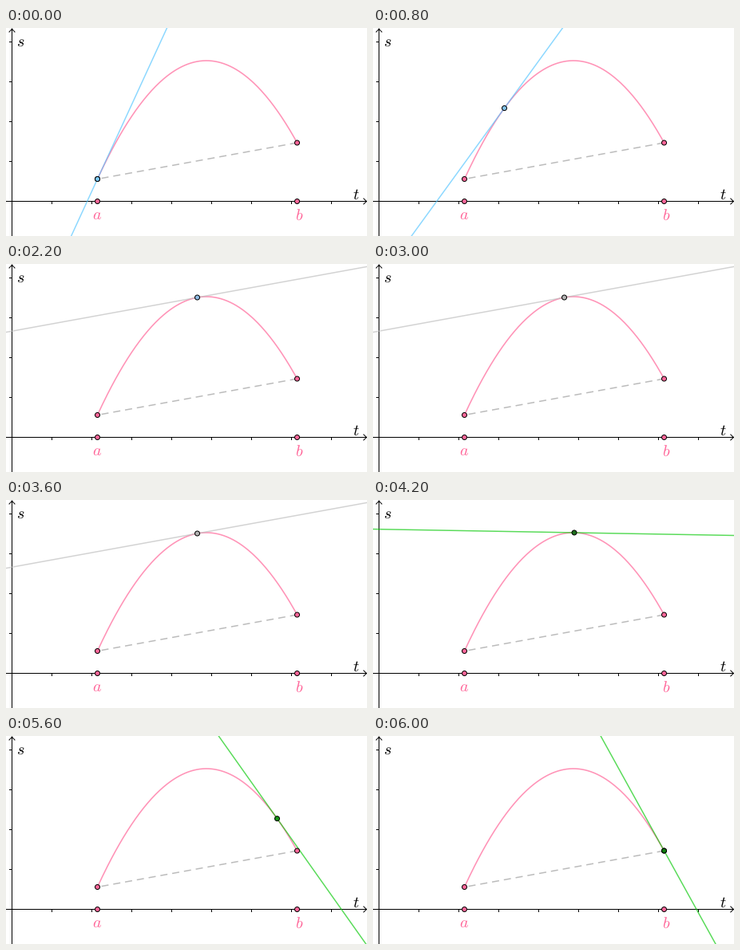
These frames come from a looping animation (452x261 px, 6.2 s). A matplotlib script:

```python
import numpy as np
import matplotlib.pyplot as plt
from matplotlib.animation import FuncAnimation
from matplotlib.colors import to_rgb

W, H, DPI = 452, 261, 64
PX = 72 / DPI            # points per pixel
FRAMES, INTERVAL = 31, 200
STEPS, HALF = 20, 10     # travel steps; the point rests at the middle one

AX_X, AX_Y = 7.5, 217.5  # position of the two axes
XA, YA, XB, YB = 114.5, 189.5, 364.5, 144.0
CHORD = (YB - YA) / (XB - XA)
BEND = 0.007984

PINK, BLUE, GREY, GREEN = "#ff6699", "#4fc3ff", "#bbbbbb", "#00c800"

# fill of the moving dot over time
DOT_KEYS = [(0, "#7cc8f5"), (7, "#84bbdc"), (11, "#8ebbe4"), (12, "#b4b4b4"),
            (20, "#b4b4b4"), (21, "#1f6f1f"), (25, "#1fb51f"), (30, "#0f7f0f")]
KEY_TIMES = [k for k, _ in DOT_KEYS]
KEY_RGB = np.array([to_rgb(c) for _, c in DOT_KEYS])

plt.rcParams["mathtext.fontset"] = "cm"
plt.rcParams["text.hinting"] = "none"
plt.rcParams["lines.scale_dashes"] = False

fig = plt.figure(figsize=(W / DPI, H / DPI), dpi=DPI, facecolor="white")
ax = fig.add_axes([0, 0, 1, 1])
ax.set_xlim(0, W)
ax.set_ylim(H, 0)
ax.axis("off")


def curve(x):
    return YA + CHORD * (x - XA) - BEND * (x - XA) * (XB - x)


def slope(x):
    return CHORD - BEND * (XA + XB - 2 * x)


def stroke(xs, ys, color="black", width=1.0, **kw):
    return ax.plot(xs, ys, color=color, lw=width * PX, snap=False, **kw)[0]


def dot(x, y, color, z=6):
    return ax.add_patch(plt.Circle((x, y), 3, fc=color, ec="black",
                                   lw=PX, snap=False, zorder=z))


def label(x, base, text, color="black"):
    ax.text(x, base, f"${text}$", color=color, fontsize=20 * PX,
            ha="center", va="baseline", zorder=5)


def draw_axes():
    stroke([0, W], [AX_Y, AX_Y])
    stroke([AX_X, AX_X], [1, H])
    for x in range(50, 401, 50):
        stroke([AX_X + x] * 2, [AX_Y, AX_Y + 3])
    for y in range(50, 201, 50):
        stroke([AX_X - 3, AX_X], [AX_Y - y] * 2)
    stroke([AX_X - 3.5, AX_X, AX_X + 3.5], [5, 1.2, 5])
    stroke([W - 4.2, W - 0.6, W - 4.2], [AX_Y - 3.5, AX_Y, AX_Y + 3.5])
    label(18.5, 23.3, "s")
    label(438.5, 214.5, "t")
    label(114.3, 240.3, "a", PINK)
    label(367.6, 242, "b", PINK)


draw_axes()
stroke([XB, XA], [YB, YA], GREY, 1.5, dashes=(9 * PX, 6 * PX),
       dash_capstyle="butt", zorder=3)
xs = np.linspace(XA, XB, 200)
stroke(xs, curve(xs), PINK, 1.6, alpha=0.7, zorder=3)
for x, y in ((XA, YA), (XB, YB), (XA, AX_Y), (XB, AX_Y)):
    dot(x, y, PINK)

tangent = stroke([], [], BLUE, 1.5, alpha=0.65, zorder=4)
mover = dot(XA, YA, BLUE, z=7)


def update(i):
    step = min(i, HALF) + max(i - (FRAMES - 1 - HALF), 0)
    x = XA + (XB - XA) * step / STEPS
    y, m = curve(x), slope(x)
    ends = np.array([-10, W + 10])
    tangent.set_data(ends, y + m * (ends - x))
    tangent.set_color(BLUE if step < HALF else GREY if step == HALF else GREEN)
    mover.center = x, y
    mover.set_facecolor([np.interp(i, KEY_TIMES, KEY_RGB[:, c])
                         for c in range(3)])
    return tangent, mover


anim = FuncAnimation(fig, update, frames=FRAMES, interval=INTERVAL,
                     repeat=True, repeat_delay=0)
plt.show()
```
